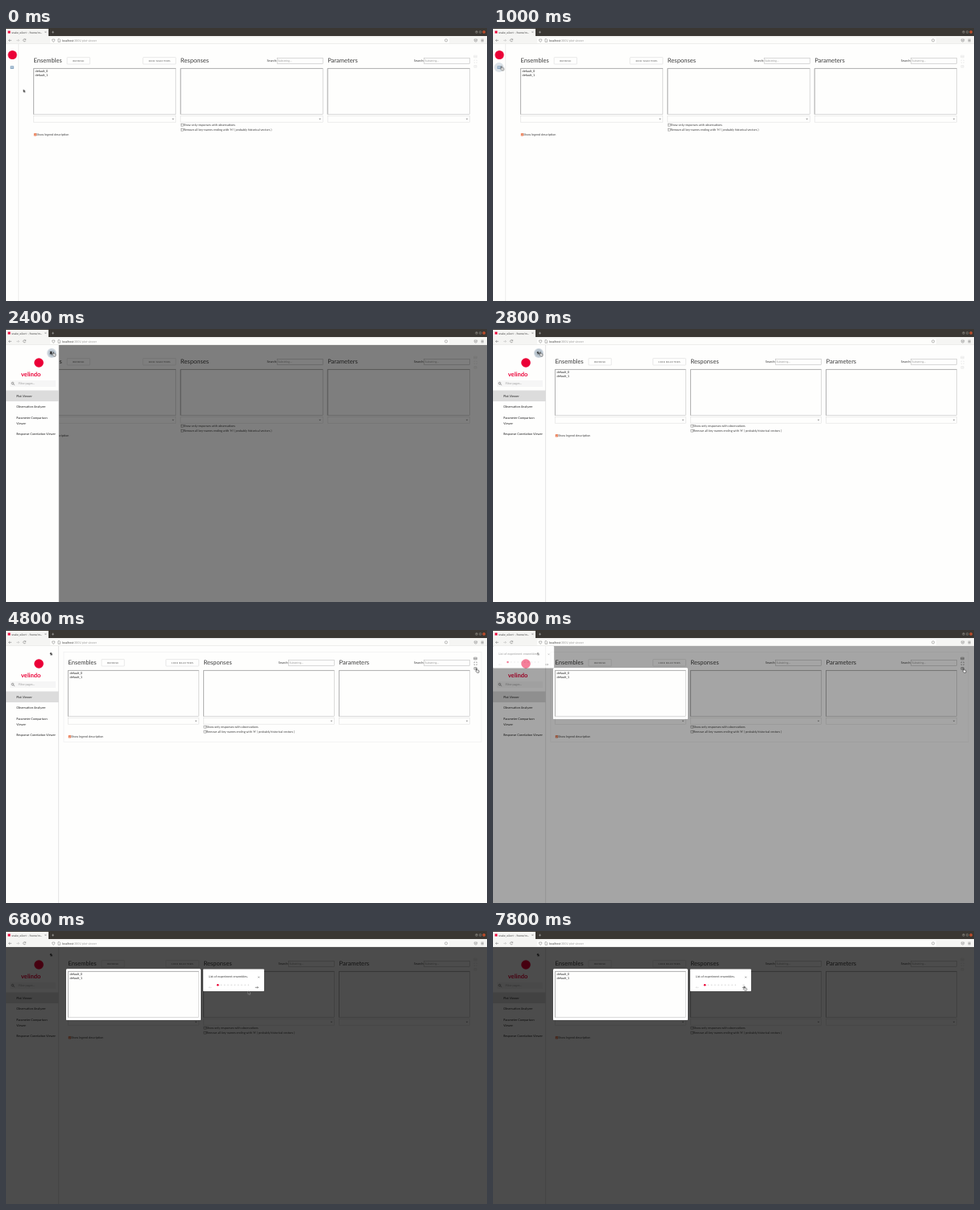
An HTML page that plays this animation: 600 px wide and 340 px high, repeating every 8 s.

```html
<!DOCTYPE html>
<html lang="en">
<head>
<meta charset="utf-8">
<title>Plot viewer tour</title>
<style>
html, body { margin: 0; width: 100%; height: 100%; overflow: hidden; background: #fefefd; }
svg { display: block; width: 600px; height: 340px; }
text { font: 3.75px Lato, sans-serif; fill: #3d3d3d; text-rendering: geometricPrecision; white-space: pre; }
.title { font-size: 7.6px; }
.search { font-size: 3.9px; }
.hint { font-size: 3.6px; fill: #999; }
.item { font-size: 3.85px; fill: #222; }
.btn { font-size: 2.7px; letter-spacing: .4px; }
.brand { font-size: 7.5px; font-weight: 700; fill: #eb0037; }
.tab { font-size: 3.4px; }
.url { font-size: 3.6px; }

.anim { animation: 8s step-end infinite; }
.wide { animation-name: wide; }
.shade { animation-name: shade; }
.drawer { animation-name: drawer; }
.menu-hover { animation-name: menu-hover; }
.pin-hover { animation-name: pin-hover; }
.ripple { animation-name: ripple; transform-origin: 57px 30px; }
.pin { animation-name: pin; transform-origin: 56.2px 29.7px; }
.hover { animation-name: hover; }
.tour { animation-name: tour; }
.pop { animation-name: pop; }
.press { animation-name: press; }
.cursor { animation-name: cursor; }
.arrow { animation-name: arrow; }
.hand { animation-name: hand; }

@keyframes wide { 0% { opacity: 0 } 35%, 100% { opacity: 1 } }
@keyframes shade { 0% { opacity: 0 } 17.5% { opacity: 1 } 35%, 100% { opacity: 0 } }
@keyframes drawer {
  0% { transform: translateX(-80px) }
  17.5% { transform: translateX(-32px) }
  20%, 100% { transform: none }
}
@keyframes menu-hover { 0% { opacity: 0 } 10%, 100% { opacity: 1 } }
@keyframes pin-hover {
  0% { opacity: 0 }
  30% { opacity: 1 }
  45% { opacity: 1; animation-timing-function: steps(4, start) }
  55%, 100% { opacity: 0 }
}
@keyframes ripple {
  0%, 35% { transform: scale(.75); animation-timing-function: steps(2, start) }
  40% { transform: scale(.9); animation-timing-function: steps(2, start) }
  45%, 100% { transform: scale(.75) }
}
@keyframes pin { 0% { transform: none } 35%, 100% { transform: rotate(-35deg) scale(.85) } }
@keyframes hover { 0% { opacity: 0 } 47.5% { opacity: 1 } 77.5%, 100% { opacity: 0 } }
@keyframes tour {
  0% { opacity: 0 }
  72.5% { opacity: .5 }
  75%, 100% { opacity: 1 }
}
@keyframes pop {
  0% { transform: translate(0, 20px) }
  77.5% { transform: translate(0, 20px); animation-timing-function: steps(2, start) }
  82.5%, 100% { transform: translate(245.8px, 47.3px) }
}
@keyframes press { 0% { opacity: 0 } 97.5%, 100% { opacity: 1 } }
/* each mouse move starts slowly, speeds up and settles */
@keyframes cursor {
  0% { transform: translate(21.5px, 76px) }
  2.5% { transform: translate(21.5px, 76px); animation-timing-function: steps(3, start) }
  10% { transform: translate(13px, 54px); animation-timing-function: steps(2, start) }
  15% { transform: translate(10.5px, 47.5px) }
  22.5% { transform: translate(10.5px, 47.5px); animation-timing-function: steps(3, start) }
  30% { transform: translate(53px, 31px) }
  30.01% { transform: translate(59px, 28.6px) }
  45% { transform: translate(59px, 28.6px); animation-timing-function: steps(2, start) }
  50% { transform: translate(150px, 32px); animation-timing-function: steps(3, start) }
  57.5% { transform: translate(520px, 45px); animation-timing-function: steps(2, start) }
  62.5% { transform: translate(587px, 47.8px) }
  77.5% { transform: translate(587px, 47.8px); animation-timing-function: steps(2, start) }
  82.5% { transform: translate(290px, 79px); animation-timing-function: steps(3, start) }
  90% { transform: translate(308px, 72px); animation-timing-function: steps(3, start) }
  97.5%, 100% { transform: translate(313.4px, 68.8px) }
}
@keyframes arrow {
  0% { opacity: 1 } 12.5% { opacity: 0 } 22.5% { opacity: 1 } 30% { opacity: 0 }
  45% { opacity: 1 } 60% { opacity: 0 } 77.5% { opacity: 1 } 97.5%, 100% { opacity: 0 }
}
@keyframes hand {
  0% { opacity: 0 } 12.5% { opacity: 1 } 22.5% { opacity: 0 } 30% { opacity: 1 }
  45% { opacity: 0 } 60% { opacity: 1 } 77.5% { opacity: 0 } 97.5%, 100% { opacity: 1 }
}
</style>
</head>
<body>
<svg id="stage" viewBox="0 0 600 340" xmlns="http://www.w3.org/2000/svg"></svg>
<script>
const paper = '#fefefd', red = '#eb0037';
const text = (x, y, s, cls = 'label', extra = '') => `<text x="${x}" y="${y}" class="${cls}" ${extra}>${s}</text>`;
const rect = (x, y, w, h, fill, extra = '') =>
  `<rect x="${x}" y="${y}" width="${w}" height="${h}" fill="${fill}" ${extra}/>`;
const box = (x, y, w, h, color, extra = '') => rect(x, y, w, h, paper, `stroke="${color}" stroke-width=".5" ${extra}`);
const line = (d, color, w = .6) => `<path d="${d}" fill="none" stroke="${color}" stroke-width="${w}"/>`;
const dot = (x, y, r, fill, extra = '') => `<circle cx="${x}" cy="${y}" r="${r}" fill="${fill}" ${extra}/>`;
const group = (cls, s) => `<g class="anim ${cls}">${s}</g>`;

const button = (x, w, label) => box(x, 36.6, w, 8.4, '#d4d4d4', 'rx=".6"') +
  text(x + w / 2 + .2, 41.8, label, 'btn', 'text-anchor="middle"');

const listBox = (x, w) => box(x, 50.4, w, 57.2, '#b8b8b8') + line(`M${x} 107.6V50.4H${x + w}`, '#a0a0a0', .7);

function column(x, w, title) {
  const r = x + w;
  return text(x, 43.2, title, 'title') + listBox(x, w) +
    box(x, 109.2, w, 8, '#dadada') +
    `<path d="M${r - 4.8} 112.7h2.6l-1.3 1.5z" fill="#888"/>`;
}

const search = r => text(r - 57.2, 42.3, 'Search:', 'search', 'text-anchor="end"') +
  box(r - 57, 37.5, 57, 7, '#b4b4b4') + text(r - 56, 42.2, 'Substring...', 'hint');

const check = (x, y, label) => box(x + .4, y - 2.8, 2.9, 2.9, '#777') + text(x + 3.6, y, label);

const names = x => text(x + 2, 55, 'default_0', 'item') + text(x + 2, 60.4, 'default_1', 'item');

const tools = color =>
  line('M583.7 34.2h3.6v2.6h-3.6zM583.7 35.6h3.6', color, .5) +
  line('M584 41v-1h1M586.3 40h1v1M587.3 42.4v1h-1M585 43.4h-1v-1', color, .5) +
  line('M583.9 46.6h3.2v2.6h-3.2zM584.6 47.9h2', color, .5);

function content(x) {
  const w = (578.5 - x - 12) / 3, x2 = x + w + 6, x3 = x2 + w + 6;
  return column(x, w, 'Ensembles') + column(x2, w, 'Responses') + column(x3, w, 'Parameters') +
    button(x + 41.7, 28.5, 'REFRESH') + button(x + w - 41, 41, 'HIDE SELECTORS') +
    names(x) + search(x2 + w) + search(x3 + w) +
    check(x2, 122, 'Show only responses with observations') +
    check(x2, 128, "Remove all key-names ending with 'H' ( probably historical vectors )") +
    rect(x + .3, 131.2, 3.2, 3.2, '#e9744a') + line(`M${x + 1} 132.8l.8.8 1.2-1.6`, '#fff', .5) +
    text(x + 3.6, 134.2, 'Show legend description') + tools('#dcdcdc');
}

const rail = rect(0, 20, 15.5, 320, paper) + rect(15.4, 20, .7, 320, '#e4e4e4') +
  dot(8, 33.5, 5.6, red) +
  group('menu-hover', dot(7.5, 49, 6, '#dbe2e8')) +
  rect(5.4, 47.3, 4.3, 3.7, '#7f9fbd', 'rx=".4"') + line('M6 48.5h3M6 49.8h3', '#fff', .4);

const pages = [[84.6, 'Plot Viewer'], [98.4, 'Observation Analyzer'], [112.3, 'Parameter Comparison'],
  [118.8, 'Viewer'], [132.3, 'Response Correlation Viewer']];

const drawer = rect(0, 20, 66, 320, paper) + rect(65.2, 20, .9, 320, '#e2e2e2') +
  dot(41, 42, 5.8, red) + text(31, 58.5, 'velindo', 'brand', 'text-anchor="middle"') +
  rect(5, 64, 57, 8, '#f6f6f6') + dot(8.3, 67.6, 1.3, 'none', 'stroke="#555" stroke-width=".6"') +
  line('M9.3 68.6l1.5 1.5', '#555') + text(15.5, 69.4, 'Filter pages...', 'hint') +
  rect(0, 76.5, 66, 13.6, '#dcdcdc') +
  pages.map(([y, s]) => text(13, y, s, 'item')).join('') +
  group('pin-hover', dot(57, 30, 6, '#d3dae1') + group('ripple', dot(57, 30, 6, '#b9c5cf'))) +
  group('pin', '<path d="M54.9 28h2.6v.5l-.4.2v1.3l.7.8v.4h-1.3v1.4h-.5v-1.4h-1.4v-.4l.7-.8v-1.3l-.4-.2z" fill="#222"/>');

let steps = '';
for (let i = 1; i < 10; i++) steps += dot(18.4 + i * 4.25, 20, .7, '#d6d6d6');

const pop = rect(0, 0, 76.2, 27.6, '#fff', 'rx="1"') +
  text(7, 10.6, 'List of experiment ensembles.') +
  line('M68.6 9.4l1.7 1.7M70.3 9.4l-1.7 1.7', '#555', .5) +
  line('M18.4 20H56.6', '#eee', .3) + steps + dot(18.4, 20, 1.3, red) +
  line('M10.8 23h-3.5l1-1M7.3 23l1 1', '#ccc', .5) +
  line('M65 23h3.8l-1.1-1.1M68.8 23l-1.1 1.1', '#444', .6);

const tour = '<path d="M0 20H600V340H0zM76.5 47.2H241.5q1.5 0 1.5 1.5V109.5q0 1.5-1.5 1.5H76.5q-1.5 0-1.5-1.5V48.7q0-1.5 1.5-1.5z" fill="#000" fill-opacity=".7" fill-rule="evenodd"/>' +
  rect(75, 47.2, 168, 63.8, '#fff', 'rx="1.5"') + listBox(77.5, 163) + names(77.5) +
  group('pop', pop) + group('press', line('M311.5 67.2h2.2', '#aaa', .5));

const chrome = rect(0, 0, 600, 10, '#3a3733') + rect(0, 1, 53, 9, '#f5f5f3') +
  rect(2.4, 3.6, 3, 3, red) + text(7, 6.5, 'snake_oil.ert - /home/m...', 'tab') +
  line('M48.6 4.3l1.6 1.6M50.2 4.3l-1.6 1.6', '#666', .5) + line('M57 5.2h3M58.5 3.7v3', '#bbb', .5) +
  dot(587, 5, 1.7, '#77746d') + dot(591.6, 5, 1.7, '#77746d') + dot(596.2, 5, 1.8, '#e4572e') +
  line('M586.2 5.5h1.6M591 4.4h1.2v1.2h-1.2z', '#222', .4) + line('M595.5 4.3l1.4 1.4M596.9 4.3l-1.4 1.4', '#222', .4) +
  rect(0, 10, 600, 10, '#f5f5f3') + rect(0, 19.6, 600, .4, '#e0e0de') +
  rect(55, 12, 498, 7, '#fdfdfb', 'rx="1"') +
  line('M6.8 15.4h-3.4l1.4-1.4M3.4 15.4l1.4 1.4', '#666', .5) +
  line('M13 15.4h3.4l-1.4-1.4M16.4 15.4l-1.4 1.4', '#b4b4b4', .5) +
  line('M24.3 14.3a1.6 1.6 0 1 0 .2 1.6M24.6 13.4v1.3h-1.3', '#666', .5) +
  line('M57.7 14h3v1.6q-.3 1.3-1.5 1.8q-1.2-.5-1.5-1.8z', '#777', .5) +
  line('M65 13.7h1.8l.8.8v2.8h-2.6z', '#777', .5) +
  text(70, 16.7, 'localhost<tspan fill="#999">:3001/plot-viewer</tspan>', 'url') +
  dot(549, 15.4, 1.6, 'none', 'stroke="#777" stroke-width=".5"') +
  line('M584.2 14h3.4v1.4a1.7 1.7 0 0 1-3.4 0zM585 15l.9.8.9-.8', '#777', .5) +
  line('M592.6 14.2h3.2M592.6 15.5h3.2M592.6 16.8h3.2', '#666', .5);

const cursor = '<path class="anim arrow" d="M0 0V4.3L1 3.5L1.7 5L2.4 4.7L1.8 3.2H3.1z" fill="#222" stroke="#fff" stroke-width=".3"/>' +
  '<path class="anim hand" d="M-.4 .3q.5-.5.9 0V2l2 .4q.7.2.6.9l-.3 1.9H.5L-1 3.3q.1-.7.6-.3z" fill="#fff" stroke="#222" stroke-width=".6"/>';

document.getElementById('stage').innerHTML =
  rect(0, 0, 600, 340, paper) + content(34.5) + rail +
  group('wide', rect(0, 20, 600, 320, paper) + content(77.5)) +
  group('hover', rect(72, 27.5, 521, 112, 'none', 'stroke="#efefef" stroke-width=".7"') + tools('#6a6a6a')) +
  group('shade', rect(0, 20, 600, 320, '#000', 'fill-opacity=".5"')) +
  group('drawer', drawer) + group('tour', tour) + chrome + group('cursor', cursor);
</script>
</body>
</html>
```
